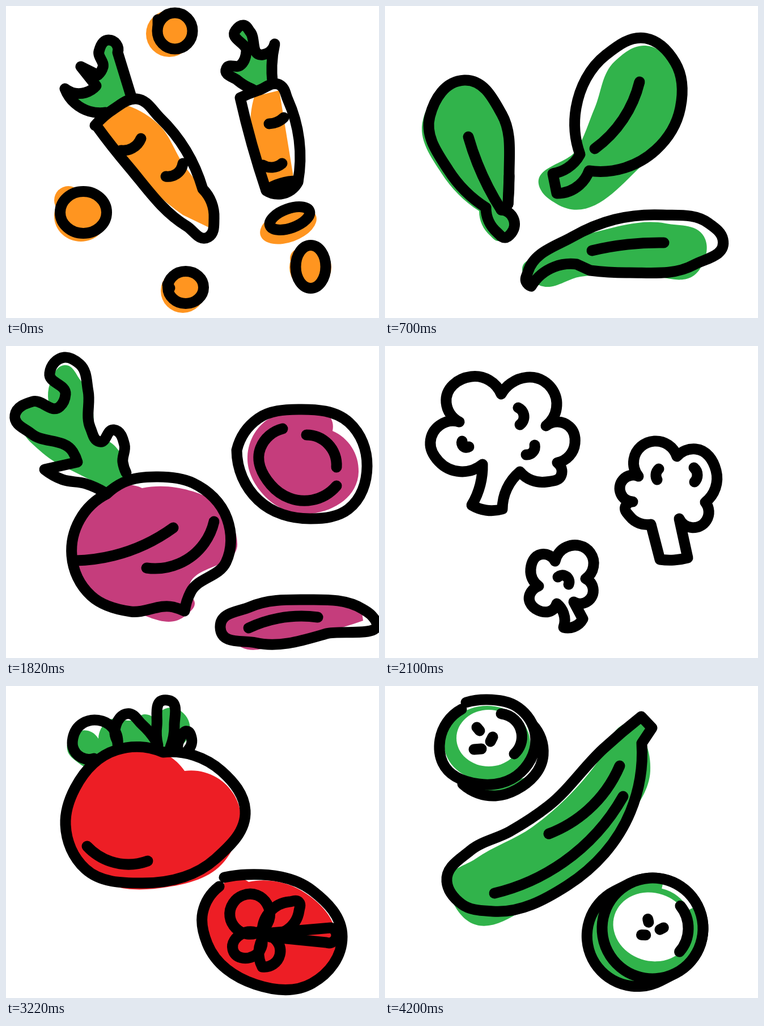
An HTML page with a canvas for the animation above (4.9 s loop, 658 by 551 pixels).

```html
<!DOCTYPE html>
<html lang="en">
<head>
<meta charset="utf-8">
<title>Salad ingredients</title>
<style>
  html, body { margin: 0; width: 100%; height: 100%; overflow: hidden; background: #fff; }
  canvas { display: block; }
</style>
</head>
<body>
<canvas id="stage" width="658" height="551"></canvas>
<script>
const ctx = document.getElementById('stage').getContext('2d');
const HOLD = 700, PEN = 19;
const GREEN = '#31b34b', ORANGE = '#ff9520', BEET = '#c53d7c', RED = '#ed1e25', CREAM = '#ffe8cf';
const WHITE = '#fff', BLACK = '#000';
const rad = degrees => degrees * Math.PI / 180;
const cache = new Map();

// Arc-like spline through "x,y" points; "*" marks a corner, a final "z" closes the curve.
function buildPath(text) {
  const closed = text.endsWith('z');
  const pts = text.match(/\d\S*/g).map(word => {
    const [x, y] = word.split(',').map(parseFloat);
    return { x, y, corner: word.endsWith('*') };
  });
  const n = pts.length;
  const chord = (a, b) => {
    const dx = b.x - a.x, dy = b.y - a.y, len = Math.hypot(dx, dy) || 1;
    return { x: dx / len, y: dy / len, len };
  };
  const tangents = pts.map((p, i) => {
    if (p.corner || (!closed && (i === 0 || i === n - 1))) return null;
    const u = chord(pts[(i + n - 1) % n], p), v = chord(p, pts[(i + 1) % n]);
    const x = u.x * v.len + v.x * u.len, y = u.y * v.len + v.y * u.len;
    const len = Math.hypot(x, y) || 1;
    return { x: x / len, y: y / len };
  });
  const mirror = (t, u) => {
    const k = 2 * (t.x * u.x + t.y * u.y);
    return { x: k * u.x - t.x, y: k * u.y - t.y };
  };
  const reach = (t, u) => 2 * u.len / (3 * (1 + Math.max(0, t.x * u.x + t.y * u.y)));

  const path = new Path2D();
  path.moveTo(pts[0].x, pts[0].y);
  for (let i = 0; i < (closed ? n : n - 1); i++) {
    const j = (i + 1) % n, a = pts[i], b = pts[j], u = chord(a, b);
    const s = tangents[i] || (tangents[j] ? mirror(tangents[j], u) : u);
    const e = tangents[j] || (tangents[i] ? mirror(tangents[i], u) : u);
    const p = reach(s, u), q = reach(e, u);
    path.bezierCurveTo(a.x + s.x * p, a.y + s.y * p, b.x - e.x * q, b.y - e.y * q, b.x, b.y);
  }
  if (closed) path.closePath();
  return path;
}

function curve(text) {
  if (!cache.has(text)) cache.set(text, buildPath(text));
  return cache.get(text);
}

function fill(color, text) {
  ctx.fillStyle = color;
  ctx.fill(curve(text));
}

function ink(...lines) {
  for (const text of lines) ctx.stroke(curve(text));
}

// Colour printed slightly out of register, then the outline.
function offPrint(color, dx, dy, text) {
  fill(color, text);
  ctx.save();
  ctx.translate(dx, dy);
  fill(color, text);
  ctx.restore();
  ink(text);
}

function oval(x, y, rx, ry, tilt = 0) {
  ctx.beginPath();
  ctx.ellipse(x, y, rx, ry, rad(tilt), 0, 2 * Math.PI);
}

function blob(color, ...shape) {
  oval(...shape);
  ctx.fillStyle = color;
  ctx.fill();
}

function ring(...shape) {
  oval(...shape);
  ctx.stroke();
}

function line(x1, y1, x2, y2, width = PEN, color = BLACK) {
  ctx.save();
  ctx.lineWidth = width;
  ctx.strokeStyle = color;
  ctx.beginPath();
  ctx.moveTo(x1, y1);
  ctx.lineTo(x2, y2);
  ctx.stroke();
  ctx.restore();
}

// One thick round slice; every slice is the same drawing, turned.
function slice(x, y, turn, rind) {
  const R = 89, depth = 30;
  ctx.save();
  ctx.translate(x, y);
  ctx.rotate(rad(turn));
  const back = depth * Math.SQRT1_2;
  line(0, 0, back, back, 2 * R + PEN);
  line(0, 0, back, back, 2 * R - PEN, rind);
  blob(rind, 0, 0, R, R);
  blob(WHITE, -2, 2, 60, 69);
  ctx.save();
  ctx.lineCap = 'butt';
  ctx.lineWidth = 8;
  ctx.strokeStyle = WHITE;
  ctx.beginPath();
  ctx.arc(0, 0, R - 13, rad(175), rad(225));
  ctx.stroke();
  ctx.restore();
  ring(0, 0, R, R);
  ctx.beginPath();
  ctx.arc(0, 0, 63, rad(213), rad(293));
  ctx.stroke();
  line(-7, -18, -2, -13);
  line(-13, 13, -8, 10);
  line(15, 8, 17, 15);
  ctx.restore();
}

function carrots() {
  blob(ORANGE, 288, 49, 41, 41);
  blob(ORANGE, 110, 343, 25, 25);
  blob(ORANGE, 132, 371, 47, 45);
  blob(ORANGE, 312, 503, 39, 39);
  blob(ORANGE, 498, 388, 52, 29, -20);
  blob(ORANGE, 537, 462, 37, 38);
  blob(ORANGE, 517, 446, 16, 17);
  ring(298, 44, 31, 32);
  line(268, 24, 268, 34);
  ring(136.5, 364.5, 41, 37);
  ring(317, 497, 31.5, 28.5);
  line(285, 492, 289, 498);
  ring(500.5, 375, 37, 17, -20);
  ring(537.5, 460.5, 26.5, 38);

  fill(ORANGE, '165,210* 215,176* 270,210 310,275 350,335 366,395* 312,369* 215,280 z');
  offPrint(GREEN, -2, 5, '220,157* 197,82* 181,60 164,80 171,108 162,122* 132,107* 159,141* 140,153 104,146* 122,172 176,188');
  ink('157,211* 190,182 230,164 271,197 347,323* 367,375 357,408 319,389 215,282 160,212* z',
    '203,255 223,251 238,234', '282,301 300,297 312,278');

  fill(ORANGE, '438,160* 482,149* 508,308* 465,312* 432,190 z');
  offPrint(GREEN, 8, -2, '470,133 469,105 474,67* 453,86 431,46 419,34 405,43 424,80 413,105 389,110 408,131 435,147');
  ink('413,162* 445,149 484,140 497,165 515,311* 485,332 459,326* 434,245 z',
    '464,208 478,205 490,197', '453,281 470,285 487,278');
  fill(BLACK, '459,325* 485,312 515,308* 485,332 z');
  ink('459,325 485,313 515,309');
}

function leaves() {
  offPrint(GREEN, -12, 6, '217,350* 219,300 206,191 140,131 79,195 112,290 178,356* 198,400 212,409 223,401 205,360');
  ink('217,350 219,300', '147,231 163,278 205,360');

  fill(GREEN, '275,325 338,254 370,180 405,98 460,70 516,130 520,190 455,280 302,349 z');
  ink('344,262* 337,180 390,86 460,57 512,100 521,180 478,254 360,291* 343,316 303,331* 296,296* 322,286 z',
    '449,134 420,200 370,252');

  fill(GREEN, '242,465 275,438 380,397 495,384 565,412 557,462 440,472 345,478 272,493 z');
  ink('258,495* 249,487 252,470 330,408 405,377 490,369 570,383 596,412 545,457 430,471 362,467* 338,456* 298,461 z',
    '365,432 428,421 492,418');
}

function beets() {
  fill(GREEN, '80,60 102,34 131,60 150,160* 188,173 207,232* 180,252* 100,212* 60,185 28,145 30,112 82,118* z');
  ink('212,224 206,205 209,175 190,148 165,169 149,145 145,80 130,32 103,20 77,48 105,85 95,107 47,98 16,122 45,155 118,187 126,205* 68,218* 100,236 140,243 175,259');
  fill(BEET, '180,262* 210,246 240,251* 300,250 385,292 408,350 325,437 333,455 318,475 220,466 118,380 z');
  ink('178,261* 130,307 116,370 150,441 220,469 295,461 315,468* 326,434 388,382 390,305 330,242 265,231 207,241 z',
    '122,379 190,370 295,321', '248,392 350,348 367,310');

  fill(BEET, '426,195 470,125 520,118 576,135 576,150* 622,222 540,296 450,258 z');
  ink('407,184* 445,128 516,112 605,135 637,212 604,288 538,305 445,272 z',
    '488,146 449,180 467,245 540,272 583,247', '530,157 568,173 583,214');

  fill(BEET, '380,495 430,466 520,452 628,471* 630,485* 500,520 415,532 z');
  ink('378,497 430,461 525,448 630,465 645,476 565,508 440,524 z', '428,498 480,481 550,479');
}

function broccoli() {
  ink('205,85* 152,54 108,100 131,134* 80,170 95,204 172,209* 168,245 153,281* 178,290 207,288* 215,252 238,222* 285,240 311,228 304,206* 335,172 325,142 284,141* 294,75 280,62 222,66 z',
    '235,109 245,123 238,139', '136,168 138,177 148,178', '264,175 261,187 249,192',
    '515,195* 475,168 439,200 447,230* 420,236 437,275* 424,284 432,301 469,315* 485,377* 510,378 534,374* 519,305* 567,308 565,276* 584,220 548,182 z',
    '483,217 478,227 480,236', '545,215 551,228 546,240',
    '300,380* 275,368 257,394 271,424* 258,434 303,455* 315,472 315,497* 333,496 349,482* 333,452* 367,428 354,411* 362,365 320,355 z',
    '305,408 318,406 324,421');
}

function tomatoes() {
  fill(GREEN, '108,112 163,93* 180,61 225,60 245,50 264,60* 290,38 313,48 300,110* 240,105* 128,136 z');
  fill(RED, '115,210 160,135 230,110 285,122 315,150* 404,195 414,225* 385,310 285,355 150,330 z');
  ink('277,117* 380,150 422,220 370,305 240,348 140,323 105,245 122,180 195,113 z',
    '143,283 185,310 250,309',
    '155,128 118,108 118,92 197,103', '197,98 194,69 213,49 240,68 265,98',
    '268,105 266,70 284,25 297,70 290,108', '303,113 308,91 320,80 327,91 322,112');

  fill(RED, '348,420 365,370 415,340 428,346* 530,367 582,440 530,530 400,500 z');
  ink('385,338 425,333 540,361 593,442 540,525 440,527 355,455 347,400 376,354',
    '450,432 401,383 417,370 452,430', '452,432 500,381 517,382 517,397 456,438',
    '456,437 573,427* 583,439 565,453* 465,443', '448,439 415,438 400,465 437,477 450,442',
    '455,442 446,468 452,496* 483,475 457,440');
}

function bananas() {
  slice(297, 119, 0, CREAM);
  slice(236, 361, 130, CREAM);
  slice(481, 351, 20, CREAM);
}

function cucumbers() {
  fill(GREEN, '168,182* 205,176* 246,162* 225,181 195,187 z');
  blob(GREEN, 180, 101, 76, 66);
  blob(WHITE, 183, 92, 57, 50);
  ink('143,29 180,24 235,38 265,85 240,152 165,173 102,136 97,95 135,41',
    '260,68 279,122 232,183 195,194 137,173', '205,49 241,83 228,120');
  line(162, 73, 167, 79);
  line(190, 90, 186, 98);
  line(157, 112, 170, 111);

  fill(GREEN, '414,72 435,62 465,65* 460,100* 468,150 430,235 310,350 124,390 110,345 160,305 260,249 385,120 z');
  ink('453,101* 471,74* 452,54* 385,111 288,212 220,257 150,291 109,345 135,385 190,398 322,352 433,222 z',
    '414,141 358,219 289,261', '420,195 315,311 193,366');
  slice(472, 428, 108, GREEN);
}

const scenes = [carrots, leaves, beets, broccoli, tomatoes, bananas, cucumbers];

function draw() {
  ctx.fillStyle = WHITE;
  ctx.fillRect(0, 0, 658, 551);
  ctx.strokeStyle = BLACK;
  ctx.lineWidth = PEN;
  ctx.lineCap = ctx.lineJoin = 'round';
  scenes[Math.floor(performance.now() / HOLD) % scenes.length]();
  requestAnimationFrame(draw);
}
draw();
</script>
</body>
</html>
```
